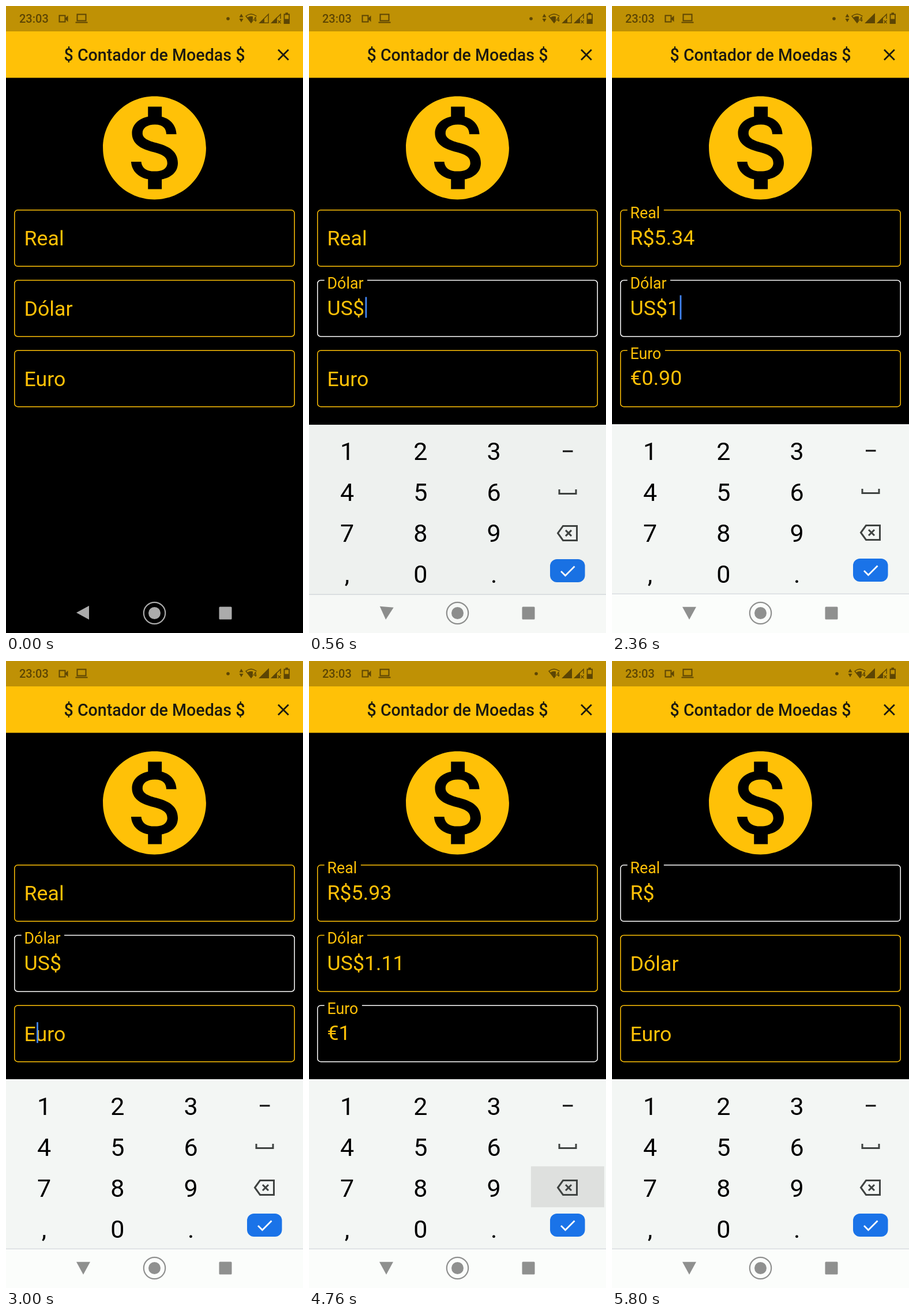
Animation, 515 px wide and 1087 px high, one loop 5840 ms. Source, as an HTML page with a canvas:

```html
<!DOCTYPE html>
<html lang="pt">
<head>
<meta charset="utf-8">
<title>Contador de Moedas</title>
<style>
html, body { margin: 0; width: 100%; height: 100%; overflow: hidden; background: #000; }
canvas { display: block; width: 515px; height: 1087px; }
</style>
</head>
<body>
<canvas></canvas>
<script>
const W = 515, H = 1087, LOOP = 5840;
const AMBER = '#ffc107', STATUS_INK = '#5c4504', STATUS_BG = '#bf9105';
const FONT = 'Roboto, sans-serif';
const canvas = document.querySelector('canvas');
const dpr = window.devicePixelRatio || 1;
canvas.width = W * dpr;
canvas.height = H * dpr;
const ctx = canvas.getContext('2d');

// Times (ms) of the user's actions
const TAP_DOLLAR = 352, TYPE_A = 1120, ERASE_A = 2570, TAP_EURO = 3000,
      TYPE_B = 3920, ERASE_B = 4850, TAP_REAL = 5290;
const cursorResets = [TAP_DOLLAR, TYPE_A, ERASE_A, TAP_EURO, TYPE_B, ERASE_B, TAP_REAL];
const KEYBOARD_IN = 320;

const fields = [
  { label: 'Real', prefix: 'R$', top: 353.8, focus: [TAP_REAL, LOOP * 2],
    floats: [[TYPE_A, ERASE_A], [TYPE_B, ERASE_B], [TAP_REAL, LOOP * 2]], values: ['5.34', '5.93'] },
  { label: 'Dólar', prefix: 'US$', top: 475.5, focus: [TAP_DOLLAR, TAP_EURO],
    floats: [[TAP_DOLLAR, TAP_EURO], [TYPE_B, ERASE_B]], values: ['1', '1.11'] },
  { label: 'Euro', prefix: '€', top: 597.2, focus: [TAP_EURO, TAP_REAL],
    floats: [[TYPE_A, ERASE_A], [TAP_EURO, TAP_REAL]], values: ['0.90', '1'] }
];
// Pressed keys: column, row, time
const presses = [[0, 0, 1040], [3, 2, 2480], [0, 0, 3800], [3, 2, 4760]];

const dollarCoin = new Path2D('M12 2C6.48 2 2 6.48 2 12s4.48 10 10 10 10-4.48 10-10S17.52 2 12 2zm1.41 16.09V20h-2.67v-1.93c-1.71-.36-3.16-1.46-3.27-3.4h1.96c.1 1.05.82 1.87 2.65 1.87 1.96 0 2.4-.98 2.4-1.59 0-.83-.44-1.61-2.67-2.14-2.48-.6-4.18-1.62-4.18-3.67 0-1.72 1.39-2.84 3.11-3.21V4h2.67v1.95c1.86.45 2.79 1.86 2.85 3.39H14.3c-.05-1.11-.64-1.87-2.22-1.87-1.5 0-2.4.68-2.4 1.64 0 .84.65 1.39 2.67 1.91s4.18 1.39 4.18 3.91c-.01 1.83-1.38 2.83-3.12 3.16z');

const clamp = x => Math.min(1, Math.max(0, x));
const mix = (a, b, p) => a + (b - a) * p;
const within = (t, [from, to]) => t >= from && t < to;

// cubic-bezier(.4, 0, .2, 1)
function ease(x) {
  let lo = 0, hi = 1;
  for (let i = 0; i < 20; i++) {
    const s = (lo + hi) / 2, r = 1 - s;
    if (1.2 * r * r * s + 0.6 * r * s * s + s * s * s < x) lo = s; else hi = s;
  }
  return lo * lo * (3 - 2 * lo);
}

function progress(t, spans) {
  const steps = spans.map(([on, off]) => Math.min(clamp((t - on) / 167), 1 - clamp((t - off) / 167)));
  return Math.max(...steps);
}

function rect(x, y, w, h, color) {
  ctx.fillStyle = color;
  ctx.fillRect(x, y, w, h);
}

function text(str, x, y, size, color, align = 'left', weight = 400) {
  ctx.font = `${weight} ${size}px ${FONT}`;
  ctx.textAlign = align;
  ctx.fillStyle = color;
  ctx.fillText(str, x, y);
  return ctx.measureText(str).width;
}

function fill(path, color) {
  ctx.fillStyle = color;
  ctx.fill(new Path2D(path));
}

function line(path, color, width) {
  ctx.strokeStyle = color;
  ctx.lineWidth = width;
  ctx.stroke(new Path2D(path));
}

function circle(x, y, r) {
  ctx.beginPath();
  ctx.arc(x, y, r, 0, 2 * Math.PI);
}

function dot(x, y, r, color) {
  circle(x, y, r);
  ctx.fillStyle = color;
  ctx.fill();
}

function drawStatusBar(t) {
  const arrows = t < 3300 || t >= 5760;
  const late = t >= 5760;
  const shift = late ? 5 : 0;
  rect(0, 0, W, 44, STATUS_BG);
  text('23:03', 23, 29.2, 20, STATUS_INK, 'left', 500);
  line('M92.5 16.5h10v11h-10z', STATUS_INK, 2);
  fill('M103 21l4.500-4.500v11l-4.500-4.500z', STATUS_INK);
  line('M123.500 14.500h15v11h-15zM120.500 28.500h21', STATUS_INK, 2);

  dot(arrows ? 385 + shift : 394, 22, 2.8, STATUS_INK);
  if (arrows) {
    ctx.save();
    ctx.translate(shift, 0);
    fill('M404.500 19.500l3.500-6 3.500 6zM404.500 22l3.500 6 3.500-6z', STATUS_INK);
    ctx.restore();
  }
  ctx.save();
  ctx.translate(shift, 0);
  line('M416 17.500Q425 10.500 434 17.500L425 29z', STATUS_INK, 1.4);
  fill('M418.500 20Q425 15.500 431.500 20L425 29.500z', STATUS_INK);
  rect(428, 18, 7, 10, STATUS_BG);
  text('4', 428.5, 27, 11, STATUS_INK, 'left', 700);
  ctx.restore();

  line('M440 29.300h15v-15z', STATUS_INK, 1.5);
  fill(t < 1680 ? 'M439 30l9-9v9z' : 'M438.500 30h17.500v-17.500z', STATUS_INK);
  line('M468 29.300h-7l15-15v8', STATUS_INK, 1.5);
  fill('M459 30l11-11v11z', STATUS_INK);
  line('M471.500 25l5 5m0-5l-5 5', STATUS_INK, 1.4);
  line('M482.500 14.500h8.500v15.500h-8.500z', STATUS_INK, 1.8);
  rect(484.500, 11.500, 4.500, 3, STATUS_INK);
  rect(482.500, 22.500, 8.500, 7.500, STATUS_INK);
}

function drawHeader() {
  rect(0, 44, W, 80.5, AMBER);
  text('$ Contador de Moedas $', W / 2, 95.3, 28.6, '#1d1a10', 'center', 500);
  line('M472 75.800l17.800 17.800m0-17.800l-17.800 17.800', '#1d1a10', 2.8);
  ctx.save();
  ctx.translate(150.2, 138.7);
  ctx.scale(8.942, 8.942);
  ctx.fillStyle = AMBER;
  ctx.fill(dollarCoin);
  ctx.restore();
}

function drawField(field, t) {
  const { label, prefix, top, focus } = field;
  const size = 35.76, left = 31.5;
  const focusing = progress(t, [focus]);
  const p = ease(progress(t, field.floats));
  const value = within(t, [TYPE_A, ERASE_A]) ? field.values[0]
              : within(t, [TYPE_B, ERASE_B]) ? field.values[1] : '';

  ctx.beginPath();
  ctx.roundRect(14.8, top, 485.4, 97.5, 5.5);
  ctx.strokeStyle = `rgb(255,${mix(193, 255, focusing)},${mix(7, 255, focusing)})`;
  ctx.lineWidth = 1.5;
  ctx.stroke();
  ctx.font = `400 ${size * 0.75}px ${FONT}`;
  const gap = ctx.measureText(label).width + 11.3;
  if (p > 0) rect(26.7, top - 2, gap * p, 4, '#000');

  ctx.globalAlpha = p;
  let end = left + text(prefix, left, top + 60, size, AMBER);
  ctx.globalAlpha = 1;
  if (value) end += text(value, end, top + 60, size, AMBER);
  text(label, left, top + mix(61.5, 14.5, p), size * mix(1, 0.75, p), AMBER);

  const lastReset = cursorResets.filter(time => time <= t).pop();
  if (within(t, focus) && (t - lastReset) % 1000 < 500) {
    const height = value ? 42 : 36;
    rect(end + 1.5, top + 47 - height / 2, 2.8, height, '#4285f4');
  }
}

function drawKeyboard(t) {
  const rest = 1 - clamp((t - KEYBOARD_IN) / 380);
  const dy = 248 * rest ** 5.55;
  const icon = '#3f4341';
  ctx.save();
  ctx.translate(0, dy);
  rect(0, 725, W, 362, '#f3f6f4');
  rect(0, 1020, W, 67, '#fbfdfb');
  rect(0, 1018.5, W, 1.5, '#d9dde1');

  for (const [col, row, time] of presses) {
    if (t < time) continue;
    ctx.globalAlpha = 1 - clamp((t - time - 120) / 160);
    rect(3 + col * 127.3, 733.5 + row * 71.3, 127, 71, '#dee0de');
  }
  ctx.globalAlpha = 1;

  ['123', '456', '789', ',0.'].forEach((keys, row) =>
    [...keys].forEach((key, col) =>
      text(key, 66 + col * 127.3, 786.5 + row * 71, 43, '#000', 'center')));
  rect(440, 769.5, 17.5, 3, '#111');
  line('M434 837v7.500h29v-7.500', icon, 3);
  line('M431.500 913l9-12.500h24v25h-24zM445 908l10 10m0-10l-10 10', icon, 3);
  ctx.beginPath();
  ctx.roundRect(418, 958, 60.5, 40, 12);
  ctx.fillStyle = '#1a73e8';
  ctx.fill();
  line('M437 979l7.500 7.500 16-16', '#fff', 2.8);

  ctx.globalAlpha = 1 - rest ** 4;
  ctx.restore();
  if (rest > 0) rect(0, 725 + dy, W, H, `rgba(0,0,0,${rest ** 4})`);
}

function drawNavigation(t) {
  const dark = clamp((t - 410) / 120);
  const shade = 255 * (1 - dark);
  const color = `rgba(${shade},${shade},${shade},${mix(0.67, 0.43, dark)})`;
  ctx.save();
  ctx.translate(134, 1051.7);
  ctx.rotate(-Math.PI / 2 * ease(clamp((t - 400) / 220)));
  fill('M-12 0L10-12V12z', color);
  ctx.restore();
  circle(257.5, 1052.5, 18.7);
  ctx.strokeStyle = color;
  ctx.lineWidth = 2.2;
  ctx.stroke();
  dot(257.5, 1052.5, 10.5, color);
  ctx.beginPath();
  ctx.roundRect(369.5, 1041.5, 22, 22, 1.5);
  ctx.fillStyle = color;
  ctx.fill();
}

function draw(now) {
  const t = now % LOOP;
  ctx.setTransform(dpr, 0, 0, dpr, 0, 0);
  rect(0, 0, W, H, '#000');
  drawStatusBar(t);
  drawHeader();
  for (const field of fields) drawField(field, t);
  if (t >= KEYBOARD_IN) drawKeyboard(t);
  drawNavigation(t);
}

const start = performance.now();
function tick() {
  draw(performance.now() - start);
  requestAnimationFrame(tick);
}
tick();
</script>
</body>
</html>
```
